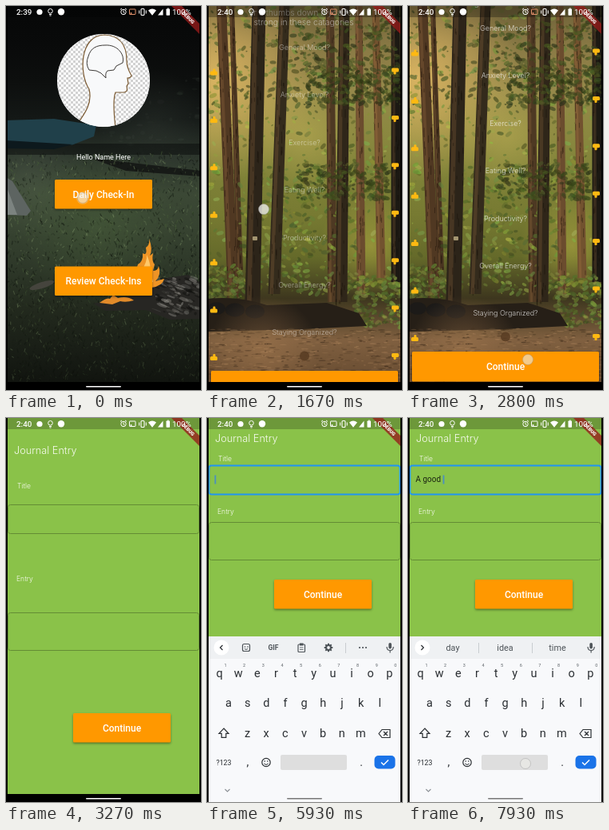
Recreate the animation shown at these times as an HTML page with a canvas. Size 244 by 480 pixels, loop 8000 ms.

```html
<!DOCTYPE html>
<html lang="en">
<head>
<meta charset="utf-8">
<title>Daily check-in app</title>
<style>
html, body { margin: 0; width: 100%; height: 100%; overflow: hidden; background: #000; }
canvas { display: block; width: 244px; height: 480px; }
</style>
</head>
<body>
<canvas id="stage" width="244" height="480"></canvas>
<script>
const W = 244, H = 480, LOOP = 8000;
const ORANGE = '#ff9800', KEY = '#2b2f33';
const screenCtx = document.getElementById('stage').getContext('2d');
let g = screenCtx;

const clamp = x => Math.max(0, Math.min(1, x));
const ramp = (t, a, b) => clamp((t - a) / (b - a));
const easeOut = x => 1 - (1 - x) ** 3;
const mix = (a, b, k) => a + (b - a) * k;

// ---- drawing helpers ----
function box(x, y, w, h, color, r = 0) {
  g.fillStyle = color;
  g.beginPath();
  g.roundRect(x, y, w, h, r);
  g.fill();
}
function frame(x, y, w, h, color, width, r = 3) {
  g.strokeStyle = color;
  g.lineWidth = width;
  g.beginPath();
  g.roundRect(x, y, w, h, r);
  g.stroke();
}
function disc(x, y, r, color) {
  blob(x, y, r, r, color);
}
function blob(x, y, rx, ry, color, turn = 0) {
  g.fillStyle = color;
  g.beginPath();
  g.ellipse(x, y, rx, ry, turn, 0, 7);
  g.fill();
}
function shape(d, fill) {
  g.fillStyle = fill;
  g.fill(new Path2D(d));
}
function line(d, color, width = 1) {
  g.strokeStyle = color;
  g.lineWidth = width;
  g.stroke(new Path2D(d));
}
function text(s, x, y, font, color, align = 'center') {
  g.font = font;
  g.fillStyle = color;
  g.textAlign = align;
  g.fillText(s, x, y);
}
const roboto = (size, weight = 400) => `${weight} ${size}px Roboto, sans-serif`;
const inter = size => `300 ${size}px Inter, sans-serif`;

function gradient(y0, y1, ...colors) {
  const grad = g.createLinearGradient(0, y0, 0, y1);
  colors.forEach((c, i) => grad.addColorStop(i / (colors.length - 1), c));
  return grad;
}
function glow(x, y, r, rgb, alpha) {
  const grad = g.createRadialGradient(x, y, 0, x, y, r);
  grad.addColorStop(0, `rgba(${rgb},${alpha})`);
  grad.addColorStop(1, `rgba(${rgb},0)`);
  box(x - r, y - r, 2 * r, 2 * r, grad);
}
function random(seed) {
  return () => (seed = seed * 16807 % 2147483647) / 2147483647;
}
function layer(paint) {
  const c = document.createElement('canvas'), previous = g;
  c.width = W;
  c.height = H;
  g = c.getContext('2d');
  paint();
  g = previous;
  return c;
}
function button(label, x, y, w = 122, h = 36.5) {
  g.save();
  g.shadowColor = 'rgba(0,0,0,.4)';
  g.shadowBlur = 3;
  g.shadowOffsetY = 1.5;
  box(x, y, w, h, ORANGE, 1.5);
  g.restore();
  text(label, x + w / 2, y + h / 2 + 4.3, roboto(12, 500), '#fff');
}

// ---- backdrops ----
const camp = layer(() => {
  const rnd = random(41);
  box(0, 0, W, H, gradient(0, 470, '#060707', '#090a0a', '#0d0f0e', '#141816', '#2c352c', '#3b4835', '#364230', '#2d3728', '#232a1e', '#1a1f17', '#11140f'));
  glow(185, 150, 70, '60,68,60', .3);
  for (let i = 0; i < 90; i++)
    blob(110 + rnd() * 134, 90 + rnd() * 100, 1 + rnd() * 4, 1 + rnd() * 2, `rgba(75,85,75,${rnd() * .16})`);
  glow(30, 215, 75, '110,125,100', .22);
  glow(115, 275, 100, '85,115,65', .3);
  box(0, 172, W, 14, 'rgba(8,11,10,.5)');
  shape('M0 143 L60 141 L113 149 L110 163 L82 174 L0 170Z', '#20404a');
  shape('M0 168 L84 173 L60 179 L0 178Z', '#0d191d');
  shape('M105 190 L244 206 V213 L150 206Z', '#171a17');
  const tones = ['120,140,98', '75,98,58', '8,12,7', '10,15,9'];
  for (let i = 0; i < 3000; i++) {
    const y = 186 + rnd() * 284, x = rnd() * W, tone = tones[Math.floor(rnd() * 4)];
    const strength = .55 - .3 * ramp(y, 330, 470);
    line(`M${x} ${y}l${rnd() * 6 - 3} ${-1 - rnd() * 4}`, `rgba(${tone},${rnd() * strength})`, 1.1);
  }
  shape('M0 214 L8 219 L31 256 L26 262 L0 261Z', '#5d6461');
  shape('M0 224 L14 261 L0 261Z', '#7c8380');
  blob(45, 349, 16, 4, '#45443d', -.3);
  shape('M110 372 L150 364 L183 352 L200 340 L228 336 L244 346 V391 L205 392 L175 380 L125 381Z', '#272623');
  for (let i = 0; i < 120; i++) {
    const x = 188 + rnd() * 54, y = 340 + rnd() * 46;
    blob(x, y, 1 + rnd() * 6, .6 + rnd() * 1.8, rnd() > .4 ? `rgba(150,148,142,${rnd() * .5})` : 'rgba(15,15,14,.5)', .35);
  }
  shape('M117 371 Q127 364 130 366 L134 361 L140 365 Q152 362 160 368 Q150 371 143 369 L133 373Z', '#e28a2a');
  shape('M160 340 L165 323 Q172 319 171 309 Q177 313 175 302 Q180 299 179 291 Q184 304 180 312 L184 309 Q182 319 186 323 L184 331 Q190 331 191 325 Q195 336 187 344 L198 341 Q196 350 182 352 L165 356Z', '#ee9426');
  shape('M170 330 Q177 319 176 311 Q181 321 181 332 L184 345 L172 346Z', '#ffc868');
});

const forest = layer(() => {
  const rnd = random(97);
  box(0, 0, W, H, gradient(0, 470, '#6d6038', '#8a7a45', '#95884a', '#8b8840', '#7f8238', '#777a32', '#656a2a', '#3d361e', '#806040', '#664a30'));
  glow(12, 90, 130, '240,195,105', .75);
  glow(122, 160, 75, '190,175,85', .55);
  glow(205, 300, 65, '190,180,70', .5);
  const leaves = (n, x, y, w, h, light, spread = 14) => {
    for (let i = 0; i < n; i++) {
      const s = rnd();
      blob(x + rnd() * w, y + rnd() * h, 1 + s * 4, .7 + s * 2,
        `hsla(${62 + rnd() * 28},${34 + rnd() * 16}%,${light + rnd() * spread}%,.6)`, rnd() * 2 - 1);
    }
  };
  const trunk = (x0, x1, w, color, end = 365) => {
    shape(`M${x0 - w / 2} 0 H${x0 + w / 2} L${x1 + w / 2 + 1} ${end} H${x1 - w / 2 - 1}Z`, color);
    line(`M${x0 - w / 4} 0 L${x1 - w / 4} ${end}`, 'rgba(210,150,90,.16)', w / 3);
    for (let i = 0; i < 45; i++) {
      const k = rnd(), x = mix(x0, x1, k) + (rnd() - .5) * w;
      line(`M${x} ${k * end}v${3 + rnd() * 9}`, 'rgba(15,10,5,.35)', 1);
    }
  };
  leaves(420, 0, 0, W, 130, 16, 26);
  leaves(420, 0, 130, W, 230, 22, 30);
  trunk(18, 33, 12, '#503822');
  trunk(31, 41, 6, '#493420', 330);
  trunk(190, 193, 9, '#6b4c2e', 360);
  trunk(211, 218, 9, '#72522f', 340);
  trunk(154, 157, 10, '#4e3923', 370);
  leaves(300, 40, 205, 150, 155, 20, 24);
  trunk(97, 84, 13, '#342b1c', 360);
  trunk(65, 57, 17, '#2c2419', 372);
  trunk(172, 168, 13, '#2f2619', 370);
  trunk(236, 237, 11, '#1c1913', 345);
  leaves(150, 110, 20, 134, 60, 13);
  leaves(300, 125, 78, 119, 45, 12);
  leaves(240, 112, 197, 115, 45, 14);
  leaves(200, 185, 338, 59, 62, 20, 24);
  leaves(130, 0, 325, 45, 45, 18, 22);
  box(57, 288, 6, 5, '#a39570', 1);
  shape('M0 366 Q40 362 75 374 L150 371 L190 384 L200 400 L120 404 L0 407Z', '#261f17');
  for (const [x, y, r] of [[35, 380, 12], [60, 382, 12], [12, 378, 11]]) blob(x, y, r, r * .7, '#1c1a18');
  glow(70, 432, 70, '165,122,80', .5);
  for (let i = 0; i < 700; i++)
    blob(rnd() * W, 403 + rnd() * 67, 1 + rnd() * 4, .7, rnd() > .5 ? `rgba(195,150,105,${rnd() * .35})` : `rgba(40,27,15,${rnd() * .45})`);
});

// ---- pages ----
function homePage(t) {
  g.drawImage(camp, 0, 0);
  g.save();
  g.beginPath();
  g.arc(122, 93, 58, 0, 7);
  g.clip();
  box(60, 30, 124, 124, '#fff');
  for (let i = 0; i < 42; i++)
    for (let j = i % 2; j < 42; j += 2) box(60 + i * 3, 32 + j * 3, 3, 3, '#d2d2d2');
  const head = 'M86 152 C101 132 108 120 104 104 C91 84 92 37 123 36 C146 37 151 54 151 68 Q151 77 157 87 Q156 90 152 90 L153 97 L151 100 Q153 108 147 108 L137 108 Q133 118 137 152';
  shape(head, '#f8f9fa');
  line(head, '#7b5a32', 1.2);
  line('M104 80 Q99 72 103 63 C106 52 114 49 124 49 C139 48 149 60 146 71 L138 75 L135 80 L127 81 Q124 83 125 90 L119 84 L113 81Z', '#3d3a37', 1);
  g.restore();
  text('Hello Name Here', 122, 192, roboto(9), '#fff');
  button('Daily Check-In', 61, 217);
  button('Review Check-Ins', 61, 325.5);
  const ripple = ramp(t, 0, 330);
  if (ripple < 1) {
    g.save();
    g.beginPath();
    g.rect(61, 217, 122, 36.5);
    g.clip();
    disc(96, 240, 8 + ripple * 90, `rgba(255,255,255,${.22 * (1 - ripple)})`);
    g.restore();
  }
}

const questions = ['General Mood?', 'Anxiety Level?', 'Exercise?', 'Eating Well?', 'Productivity?', 'Overall Energy?', 'Staying Organized?'];

function thumb(x, y, up) {
  g.save();
  g.translate(x, y);
  g.scale(up ? 1 : -1, up ? 1 : -1);
  box(-4.5, -1.5, 9, 5, '#ffb912', 1.5);
  box(-1, -4.5, 3, 5, '#ffb912', 1.2);
  g.restore();
}

function scrollLeft(t) {
  if (t < 1400) return 64;
  if (t < 1667) return mix(64, 24, ramp(t, 1400, 1667));
  return 24 * (1 - easeOut(ramp(t, 1667, 2170)));
}

function checkInPage(t) {
  const dy = scrollLeft(t);
  const ink = `rgba(255,255,255,${t > 1400 && t < 2000 ? .5 : .75})`;
  g.drawImage(forest, 0, 0);
  ['Give a thumbs up', 'or a thumbs down if you feel', 'strong in these catagories'].forEach((s, i) =>
    text(s, 121, dy - 24 + i * 12.2, inter(10.4), ink));
  questions.forEach((q, i) => {
    const y = dy + 28 + i * 59.4;
    text(q, 122, y + 3, inter(9), ink);
    thumb(8.5, y + 31, true);
    thumb(235.5, y + 29, false);
  });
  disc(122, dy + 413.5, 6, 'rgba(85,57,32,.8)');
  button('Continue', 5, dy + 432, 234, 37.5);
}

// heading, label, field, label, field, button
const poses = [
  [45, 88, 108.5, 203.5, 243.5, 369],
  [44, 84.5, 103.5, 195, 232.5, 352],
  [30, 53.5, 59.5, 119.5, 130.5, 202]
];
const BAR = 16 / 197;

const keyboardLift = t => t < 4730 ? 0 : mix(BAR, 1, easeOut(ramp(t, 5000, 5330)));

function journalPage(t) {
  const k = keyboardLift(t), low = k <= BAR;
  const part = low ? k / BAR : (k - BAR) / (1 - BAR);
  const [a, b] = low ? poses : poses.slice(1);
  const [head, label1, field1, label2, field2, btn] = a.map((y, i) => mix(y, b[i], part));
  const focused = t >= 4470;
  box(0, 0, W, H, '#8ac249');
  text('Journal Entry', 10, head, inter(12.7), '#f6faee', 'left');
  text('Title', 14, label1, inter(8.6), '#f6faee', 'left');
  frame(2.5, field1, 239, 36, focused ? '#2196f3' : '#648d35', focused ? 1.8 : 1);
  text('Entry', 13, label2, inter(8.6), '#f6faee', 'left');
  frame(2.5, field2, 239, 47, '#648d35', 1);
  button('Continue', 84, btn);
  const typed = typedText(t);
  text(typed, 9.5, field1 + 20.5, roboto(10), '#1c2512', 'left');
  const typing = t > 6300;
  if (focused && (typing || Math.floor((t - 4470) / 500) % 2 === 0))
    box(9.5 + g.measureText(typed).width, field1 + 12, 1.8, 11, '#4a8fc0');
}

// ---- keyboard ----
const rows = [['qwertyuiop', 15.5, 319], ['asdfghjkl', 27, 356], ['zxcvbnm', 50.5, 394]];
const STEP = 23.65;
const taps = [[6070, 'shift'], [6330, 'A'], [6600, ' '], [6870, 'g'], [7070, 'o'], [7330, 'o'], [7600, 'd'], [7860, ' ']];
const hints = { 'A': ['A', 'And', 'As'], 'A ': ['few', 'lot', 'good'], 'A g': ['g', 'good', 'great'],
  'A go': ['go', 'good', 'got'], 'A goo': ['goo', 'good', 'goods'], 'A good': ['food', 'good', 'goods'],
  'A good ': ['day', 'idea', 'time'] };

const typedText = t => taps.filter(([at, key]) => at <= t && key !== 'shift').map(tap => tap[1]).join('');

function keyPlace(key) {
  if (key === 'shift') return [21, 394];
  if (key === ' ') return [147, 432];
  const [letters, x, y] = rows.find(r => r[0].includes(key.toLowerCase()));
  return [x + letters.indexOf(key.toLowerCase()) * STEP, y];
}

function keyboardBar(words) {
  const gray = '#4d5358';
  box(0, 273, W, 28, '#eff1f3');
  disc(18, 287, 9.5, '#fff');
  line(words ? 'M16.5 284l3 3l-3 3' : 'M19.5 284l-3 3l3 3', KEY, 1.2);
  if (words) {
    words.forEach((w, i) => text(w, 56 + i * 65.5, 291, roboto(10.8), gray));
    line('M88.5 281V294M155.5 281V294', '#c9cdd0');
  } else {
    frame(44.5, 282.5, 9, 9, gray, 1.2, 2);
    disc(47.5, 286, .8, gray);
    disc(51, 286, .8, gray);
    line('M47 288.5q2 2 4 0', gray);
    text('GIF', 83, 290.3, roboto(8.5, 700), gray);
    frame(114, 283, 8.5, 9.5, gray, 1.2, 1);
    box(116, 281.5, 4.5, 3, gray);
    line('M116 287h4.5M116 289.5h4.5', gray, .8);
    for (let i = 0; i < 8; i++) {
      const c = Math.cos(i * Math.PI / 4), s = Math.sin(i * Math.PI / 4);
      line(`M${152 + c * 3} ${287 + s * 3}L${152 + c * 5.3} ${287 + s * 5.3}`, gray, 2);
    }
    g.beginPath();
    g.arc(152, 287, 2.9, 0, 7);
    g.lineWidth = 2;
    g.stroke();
    line('M173.5 281V294', '#c9cdd0');
    for (const x of [191, 195, 199]) disc(x, 287, 1.1, gray);
  }
  box(227.3, 281, 3.6, 7.5, gray, 1.8);
  line('M225 286q0 4.5 4.1 4.5q4.1 0 4.1 -4.5M229.1 290.5v3', gray, 1.2);
}

function keyboard(t) {
  const upper = t >= 6130 && t < 6330;
  box(0, 273, W, 207, '#f8f9fb');
  keyboardBar(hints[typedText(t)]);
  rows.forEach(([letters, x, y], r) => [...letters].forEach((ch, i) => {
    text(upper ? ch.toUpperCase() : ch, x + i * STEP, y + 5, roboto(14.5), KEY);
    if (!r) text((i + 1) % 10, x + 7.5 + i * STEP, y - 8, roboto(5.5), '#5c6267');
  }));
  const shift = 'M21 388l6 6.3h-3.2v5h-5.6v-5h-3.2z';
  if (upper) shape(shift, KEY);
  line(shift, KEY, 1.2);
  line('M215 394.5l4 -5h10v10h-10zM221 392l5 5M226 392l-5 5', KEY, 1.2);
  text('?123', 21, 434, roboto(8.8), KEY);
  text(',', 51, 435, roboto(14), KEY);
  text('.', 193, 435, roboto(14), KEY);
  g.beginPath();
  g.arc(74, 430.5, 5.2, 0, 7);
  g.stroke();
  disc(72.2, 429, .8, KEY);
  disc(75.8, 429, .8, KEY);
  line('M71.3 432q2.7 3 5.4 0', KEY);
  box(92, 421, 83, 19, '#dedede', 2);
  box(209.5, 422, 26, 16.5, '#1a73e8', 5);
  line('M218 430.5l3 3l6 -6', '#fff', 1.5);
  line('M22.5 464l3 3l3 -3', '#8a8f94', 1.1);
  box(100, 475, 44, 1.6, '#777', 1);
}

// ---- system chrome ----
function statusBar(t, journal) {
  const white = '#fff';
  box(0, 0, W, 14, journal ? '#6d983a' : 'rgba(0,0,0,.28)');
  shape('M207 0H220L242 22V35Z', 'rgba(150,28,26,.78)');
  g.save();
  g.translate(228, 14.5);
  g.rotate(Math.PI / 4);
  text('DEBUG', 0, 2, roboto(6, 900), white);
  g.restore();
  text(t < 600 ? '2:39' : '2:40', 13, 11, roboto(9.8, 500), white, 'left');
  disc(42, 7.5, 3.6, white);
  g.strokeStyle = white;
  g.lineWidth = 1;
  for (const [x, y, r] of [[55.5, 6.3, 2.8], [147, 7.5, 3.2]]) {
    g.beginPath();
    g.arc(x, y, r, 0, 7);
    g.stroke();
  }
  line('M54 10.5h3M54.5 12h2M147 5.5v2.3l1.5 1M143 4.5l2 -1.6M151 4.5l-2 -1.6', white);
  disc(69, 7.3, 4.2, white);
  const cast = journal ? white : '#e0906a';
  frame(154.5, 4, 7.5, 6.5, cast, 1, .5);
  disc(156.5, 9, 1, cast);
  frame(169, 3.5, 4, 8, white, 1.1, 1);
  line('M166.7 5.5v4M175.3 5.5v4', white);
  shape('M178 5.5Q183 1.5 188 5.5L183 11.8Z', white);
  shape('M190 11.5L196.5 11.5V3.5Z', white);
  box(200.5, 3.5, 4.5, 8.3, white, .7);
  box(201.8, 2.6, 2, 1, white);
  text('100%', 208, 11, roboto(9.8), white, 'left');
}

function touch(t) {
  const dots = [
    [0, 70, 96, 240, 0, .55], [1400, 1730, 71, 294, -40, .8], [2730, 2900, 150, 442, 0, .6], [4260, 4400, 110, 126, 0, .7],
    ...taps.map(([at, key]) => [at, at + 140, ...keyPlace(key), 0, .6])
  ];
  for (const [from, to, x, y, drag, alpha] of dots) {
    if (t < from || t >= to) continue;
    const cy = y + drag * ramp(t, 1400, 1667);
    disc(x, cy, 6.5, `rgba(236,236,232,${alpha})`);
    g.beginPath();
    g.arc(x, cy, 6.5, 0, 7);
    g.lineWidth = .8;
    g.strokeStyle = 'rgba(150,150,150,.5)';
    g.stroke();
  }
}

function enter(page, t, k) {
  if (k <= 0) return;
  if (k >= 1) return page(t);
  const picture = layer(() => page(t));
  g.globalAlpha = k;
  g.drawImage(picture, 0, (1 - easeOut(k)) * 90);
  g.globalAlpha = 1;
}

function draw(t) {
  const toCheckIn = ramp(t, 400, 730), toJournal = ramp(t, 2870, 3200);
  g.clearRect(0, 0, W, H);
  if (toCheckIn < 1) homePage(t);
  if (toJournal < 1) enter(checkInPage, t, toCheckIn);
  enter(journalPage, t, toJournal);
  statusBar(t, toJournal > .5);

  box(0, 470, W, 10, '#000');
  box(100, 475, 44, 1.6, '#fff', 1);
  const k = keyboardLift(t);
  if (k > BAR) {
    g.save();
    g.translate(0, (1 - k) * 197);
    keyboard(t);
    g.restore();
  } else if (k) {
    box(0, 454, W, 16, '#050505');
    line('M22.5 464l3 3l3 -3', '#fff', 1.1);
  }
  touch(t);
  box(0, 0, 2, H, '#000');
  box(242, 0, 2, H, '#000');
}

const start = performance.now();
function tick() {
  const t = (performance.now() - start) % LOOP;
  draw(Math.floor(t * .015 + .05) / .015);
  requestAnimationFrame(tick);
}
tick();
</script>
</body>
</html>
```
